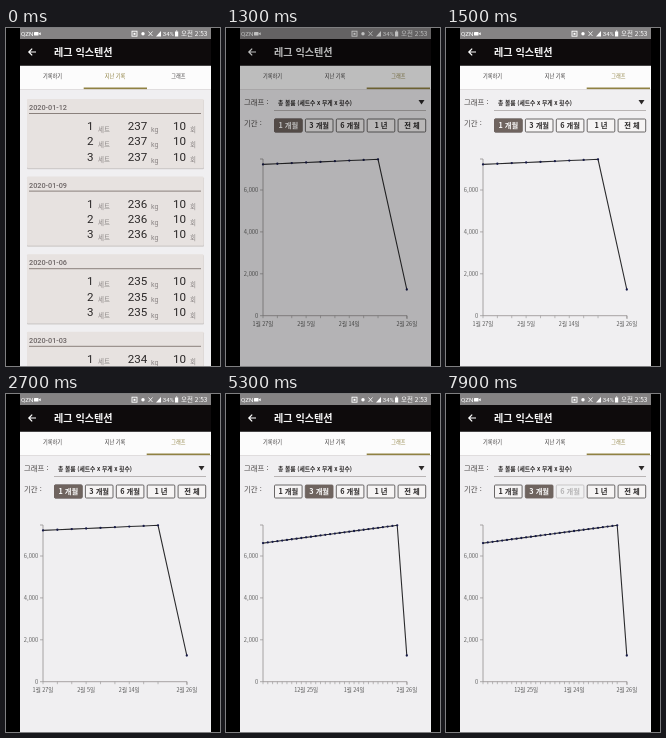
Recreate the animation shown at these times as an HTML page. Size 214x338 px, loop 8000 ms.

```html
<!DOCTYPE html>
<html lang="ko">
<head>
<meta charset="utf-8">
<title>운동 기록</title>
<style>
  html, body { margin: 0; width: 100%; height: 100%; overflow: hidden; background: #000; }
  svg { display: block; width: 214px; height: 338px; font-family: "Noto Sans CJK KR", "Noto Sans", sans-serif; }
  .num { font-family: Roboto, sans-serif; }
  .b { font-weight: 700; }
  .h { font-weight: 500; }
  .m { text-anchor: middle; }
  .e { text-anchor: end; }

  .slide, .bar, .month, .quarter, .old, .new, .press3, .press6, .dim { animation: 8s step-end -.03s infinite; }
  .slide { animation-name: slide; }
  .bar { animation-name: bar; }
  .month { animation-name: month; }
  .quarter { animation-name: quarter; }
  .old { animation-name: old; }
  .new { animation-name: new; }
  .press3 { animation-name: press3; }
  .press6 { animation-name: press6; }
  .dim { animation-name: dim; animation-timing-function: linear; }

  @keyframes slide {
    0% { transform: translateX(0); }
    7.5% { transform: translateX(-154px); }
    8.75% { transform: translateX(-185px); }
    10%, 100% { transform: translateX(-191px); }
  }
  @keyframes bar {
    0% { transform: translateX(0); }
    10% { transform: translateX(40px); }
    11.25%, 100% { transform: translateX(63px); }
  }
  @keyframes month { 0% { opacity: 0; } 12.5% { opacity: 1; } 66.25%, 100% { opacity: 0; } }
  @keyframes quarter { 0% { opacity: 0; } 66.25%, 100% { opacity: 1; } }
  @keyframes old { 0% { opacity: 1; } 10%, 100% { opacity: 0; } }
  @keyframes new { 0% { opacity: 0; } 10%, 100% { opacity: 1; } }
  @keyframes press3 { 0% { opacity: 1; } 62.5% { opacity: .3; } 66.25%, 100% { opacity: 1; } }
  @keyframes press6 { 0% { opacity: 1; } 98.75%, 100% { opacity: .3; } }
  /* The screen darkens while the graph loads, then clears. */
  @keyframes dim {
    0%, 7.49% { opacity: 0; }
    7.5% { opacity: .37; }
    9%, 14.4% { opacity: .5; }
    18.9%, 100% { opacity: 0; }
  }
</style>
</head>
<body>
<svg id="stage" viewBox="0 0 214 338"></svg>
<script>
const INK = '#2b2828', GREY = '#8b8585', OLIVE = '#8f8142', PAPER = '#f0eff1', AXIS = '#939090';

const text = (x, y, size, s, cls = '', fill = INK) =>
  `<text x="${x}" y="${y}" font-size="${size}" class="${cls}" fill="${fill}">${s}</text>`;
const rect = (x, y, w, h, fill, more = '') =>
  `<rect x="${x}" y="${y}" width="${w}" height="${h}" fill="${fill}" ${more}/>`;
const path = (d, stroke, width = 1, fill = 'none') =>
  `<path d="${d}" stroke="${stroke}" stroke-width="${width}" fill="${fill}"/>`;
const group = (cls, s) => `<g class="${cls}">${s}</g>`;
const range = (n, fn) => Array.from({ length: n }, (_, i) => fn(i)).join('');

function card(date, weight, i) {
  const y = 71 + i * 77.6;
  const row = k => {
    const base = y + 31 + k * 15.4;
    return text(87.5, base, 11.6, k + 1, 'num e') + text(92, base + 1.6, 6.5, '세트', '', GREY)
      + text(141.2, base, 11.6, weight, 'num e') + text(145, base + 1.8, 7, 'kg', 'num', GREY)
      + text(180, base, 11.6, 10, 'num e') + text(184, base + 1.6, 6.5, '회', '', GREY);
  };
  return rect(21, y + .8, 177, 69.4, '#cfcbca', 'rx="1"') + rect(21, y, 176.6, 69, '#e7e2e0', 'rx="1"')
    + text(23, y + 11, 7.3, date, 'num h', '#6b6464')
    + rect(23, y + 14, 172, 1, '#8a807c') + range(3, row);
}

function button(i, label, on = false) {
  const x = 48.5 + i * 30.9;
  return rect(x, 91, 27.6, 13, on ? '#6f645f' : '#f6f4f4', `rx="1" stroke="${on ? '#6f645f' : '#5b5757'}" stroke-width=".9"`)
    + text(x + 13.8, 100.2, 7.3, label, 'b m', on ? '#fff' : INK);
}

// One record every three days, then a last one six days later.
function chart(days, labels) {
  const px = 143.8 / days, count = (days - 6) / 3 + 1;
  const pts = Array.from({ length: count }, (_, i) => [37 + i * 3 * px, 131.3 + (count - 1 - i) * .635]);
  pts.push([180.8, 261.5]);
  const axes = path('M34 131H37V287.7H181V291', AXIS, .8)
    + [0, 2, 4, 6].map(k => {
        const y = 287.7 - k * 20.95;
        return path(`M34 ${y}H37`, AXIS, .7) + text(32.3, y + 2.2, 5.8, k ? k + ',000' : 0, 'e', '#666');
      }).join('');
  const ticks = pts.map(p => path(`M${p[0]} 287.7v2.5`, AXIS, .6)).join('');
  const dots = pts.map(([x, y]) => `<circle cx="${x}" cy="${y}" r="1.15" fill="#171a48"/>`).join('');
  return axes + ticks + path('M' + pts.join('L'), '#2a2a2c', 1.1) + dots
    + labels.map(([d, s]) => text(37 + d * px, 298.3, 5.5, s, 'm', '#555')).join('');
}

const tab = (x, s, cls = '') => text(x, 50.2, 5.2, s, 'h m', cls === 'on' ? OLIVE : '#3f3c3c');

const records = rect(14, 61, 191, 277, PAPER)
  + ['2020-01-12', '2020-01-09', '2020-01-06', '2020-01-03'].map((d, i) => card(d, 237 - i, i)).join('');

const graph = `<g transform="translate(191 0)">`
  + rect(14, 61, 191, 277, PAPER)
  + text(18, 77, 7.4, '그래프 :', '', '#4b4747') + text(18, 98.2, 7.4, '기간 :', '', '#4b4747')
  + text(52, 76.8, 5.8, '총 볼륨 (세트수 x 무게 x 횟수)', 'b')
  + path('M192.5 72h6l-3 4.6z', 'none', 0, INK) + rect(48, 82, 152, .8, '#aaa5a5')
  + button(0, '1 개월') + group('press3', button(1, '3 개월')) + group('press6', button(2, '6 개월'))
  + button(3, '1 년') + button(4, '전 체')
  + group('quarter', rect(79, 90, 29, 15, PAPER) + button(1, '3 개월', true))
  + button(0, '1 개월', true)
  + group('month', chart(30, [[0, '1월 27일'], [9, '2월 5일'], [18, '2월 14일'], [30, '2월 26일']]))
  + group('quarter', chart(90, [[27, '12월 25일'], [57, '1월 24일'], [90, '2월 26일']])
      + rect(47.5, 90, 29.5, 15, PAPER) + button(0, '1 개월'))
  + '</g>';

const status = rect(14, 0, 191, 11, '#858384')
  + text(15, 8, 6.2, 'QZN', 'num', '#fff') + rect(28, 4, 4.5, 3.5, '#fff', 'rx=".6"') + path('M32.5 5.7l2.2-1.5v3z', 'none', 0, '#fff')
  + rect(126, 3.2, 5, 5, 'none', 'stroke="#fff" stroke-width=".9"') + rect(127.5, 4.8, 2, 2, '#fff')
  + '<circle cx="137" cy="5.7" r="1.7" fill="#fff"/>'
  + path('M142.5 3.5l4 4.5m0-4.5l-4 4.5', '#fff', .8) + path('M150 8.5h5v-5.5z', 'none', 0, '#fff')
  + text(156.8, 8, 6, '34%', 'num', '#fff') + rect(169, 3.5, 3.2, 5, '#fff') + rect(170, 2.5, 1.2, 1, '#fff')
  + text(175, 8.1, 6.5, '오전 2:53', '', '#fff');

const header = rect(14, 11, 191, 26.5, '#0e0b0c')
  + path('M30 24H23M26.2 20.6L22.8 24l3.4 3.4', '#fff', 1.2)
  + text(48, 27.6, 10.1, '레그 익스텐션', 'b', '#f6f6f6');

const tabs = rect(14, 37.5, 191, 23.5, '#fcfcfc') + rect(14, 61, 191, .7, '#d9d6d6')
  + tab(46.5, '기록하기') + tab(109, '지난 기록') + tab(172.5, '그래프')
  + group('old', rect(96, 44, 26, 10, '#fcfcfc') + tab(109, '지난 기록', 'on'))
  + group('new', rect(162, 44, 21, 10, '#fcfcfc') + tab(172.5, '그래프', 'on'))
  + group('bar', rect(77.7, 59.5, 63.3, 1.6, OLIVE));

document.getElementById('stage').innerHTML =
  '<clipPath id="screen"><rect x="14" y="0" width="190.3" height="338"/></clipPath>'
  + rect(0, 0, 214, 338, '#000')
  + `<g clip-path="url(#screen)">${group('slide', records + graph)}${tabs}${header}${status}</g>`
  + rect(14, 0, 191, 338, '#000', 'class="dim"');
</script>
</body>
</html>
```
